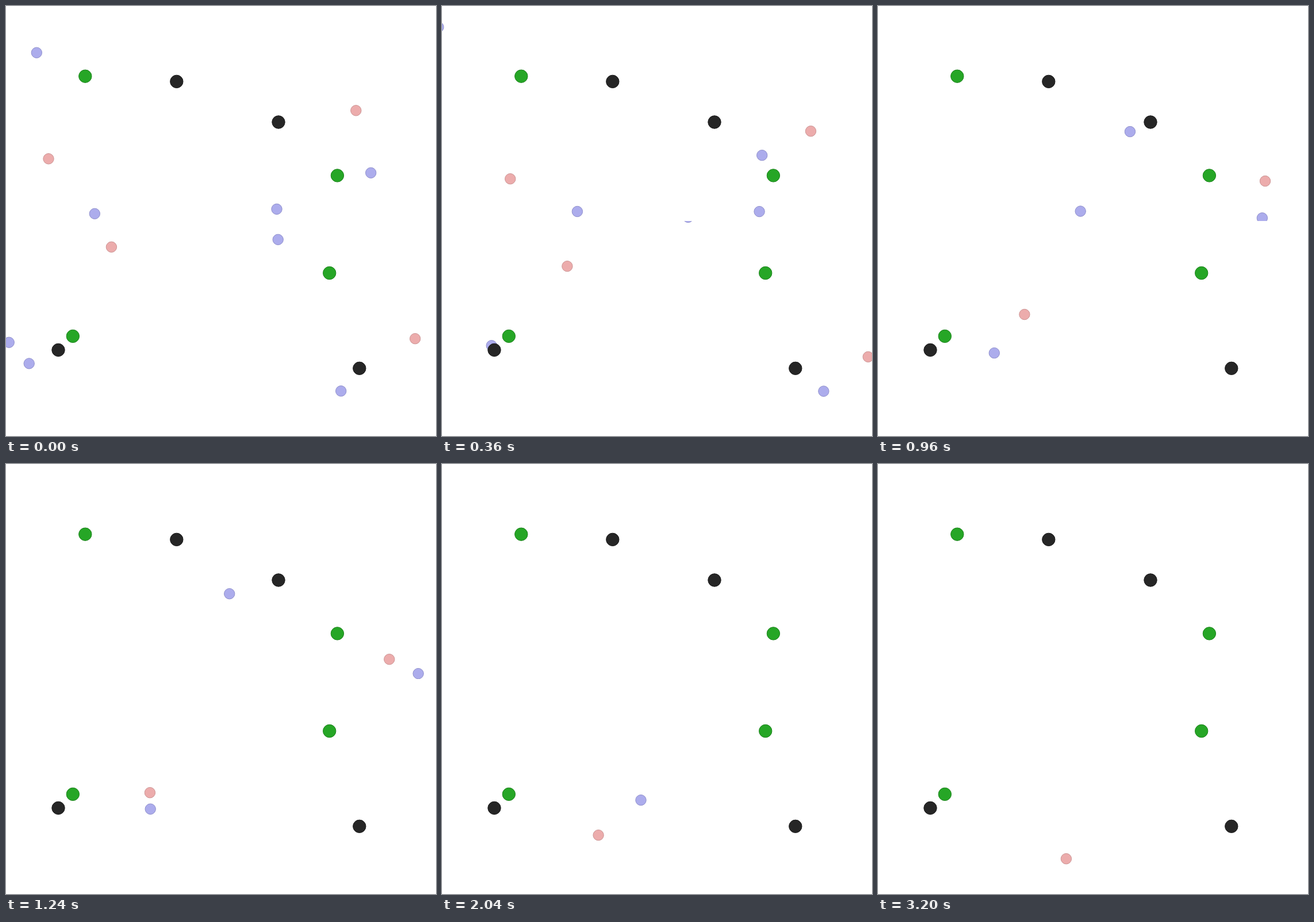
An HTML page with a canvas that plays this animation: 748 by 748 pixels, repeating every 3.24 s.

```html
<!DOCTYPE html>
<html lang="en">
<head>
<meta charset="utf-8">
<title>Drifting particles</title>
<style>
html, body { margin: 0; width: 100%; height: 100%; overflow: hidden; background: #fff; }
canvas { display: block; }
</style>
</head>
<body>
<canvas id="stage" width="748" height="748"></canvas>
<script>
const ctx = document.getElementById('stage').getContext('2d');
const LOOP = 3240, STEP = 40, SIZE = 748, HALF = SIZE / 2;

const BLUE = ['#acacec', '#8f8fcb'], PINK = ['#ecacac', '#cb9393'];
const GREEN = ['#26a626', '#1d821d'], BLACK = ['#262626', '#1c1c1c'];

// Each kind of drift is one shared path of key points: time, then offset from the start.
const path = (...keys) => [[0, 0, 0], ...keys].map(([t, x, y]) => ({ t, x, y }));
const right = path([360, 81, 5.5], [680, 144, 17], [1240, 246, 15], [1600, 299.5, 8],
  [1900, 328, -2.5], [2520, 383, 27]);
const left = path([360, -78, -30.5], [680, -145.5, -62.5], [900, -185.5, -71.5],
  [1240, -246, -64.5], [1600, -310, -68]);
const down = path([360, 34.5, 33.5], [680, 66, 80], [1240, 67, 152.5], [1600, 62, 196],
  [2240, 104.5, 234], [2520, 124.5, 239.5], [3200, 144, 267.5]);

// A mover follows its path from (x, y), turned by some radians and scaled.
const mover = (style, drift, x, y, turn = 0, scale = 1) => ({ style, drift, x, y, turn, scale });

// Four clipped panels, left to right and top to bottom, in stage coordinates.
const panels = [
  { green: [137.8, 122.2], black: [296.8, 131.4], movers: [
    mover(BLUE, left, 53.3, 81.2, 0.269, 0.887),
    mover(PINK, down, 74, 265.8, -0.108, 1.18),
    mover(BLUE, right, 154.3, 361.3, -0.115)
  ] },
  { green: [576.4, 294.9], black: [474, 202], movers: [
    mover(BLUE, right, 471, 353.3, -0.015),
    mover(PINK, down, 608.8, 181.8, 0.062, 1.01),
    mover(BLUE, left, 634.7, 290.2)
  ] },
  { green: [116.3, 574.4], black: [91, 598.4], movers: [
    mover(BLUE, right, 5.2, 585.2),
    mover(BLUE, left, 40.2, 621.9, 0.3, 0.8),
    mover(PINK, down, 183.4, 419.2)
  ] },
  { green: [562.7, 464.5], black: [614.8, 630.3], movers: [
    mover(BLUE, left, 473.2, 406.3, 0.34, 0.711),
    mover(PINK, down, 711.7, 578.7, 0.047, 0.9),
    mover(BLUE, right, 582.7, 669.8, -0.064)
  ] }
];

function slope(keys, i, axis) {
  const rate = k => (keys[k + 1][axis] - keys[k][axis]) / (keys[k + 1].t - keys[k].t);
  if (i === 0) return rate(0);
  if (i === keys.length - 1) return rate(i - 1);
  const before = keys[i].t - keys[i - 1].t, after = keys[i + 1].t - keys[i].t;
  return (rate(i - 1) * after + rate(i) * before) / (before + after);
}

// Cubic Hermite curve through the key points.
function along(keys, t, axis) {
  let i = 0;
  while (i < keys.length - 2 && t > keys[i + 1].t) i++;
  const a = keys[i], b = keys[i + 1], h = b.t - a.t, u = (t - a.t) / h, v = 1 - u;
  return v * v * (1 + 2 * u) * a[axis] + u * u * (1 + 2 * v) * b[axis] +
    h * u * v * (v * slope(keys, i, axis) - u * slope(keys, i + 1, axis));
}

function dot([fill, line], x, y, r) {
  ctx.beginPath();
  ctx.arc(x, y, r, 0, 2 * Math.PI);
  ctx.fillStyle = fill;
  ctx.fill();
  ctx.strokeStyle = line;
  ctx.stroke();
}

function drawMover({ style, drift, x, y, turn, scale }, t) {
  if (t > drift.at(-1).t) return;
  const dx = along(drift, t, 'x') * scale, dy = along(drift, t, 'y') * scale;
  const c = Math.cos(turn), s = Math.sin(turn);
  dot(style, x + dx * c - dy * s, y + dx * s + dy * c, 9.2);
}

function draw(t) {
  ctx.clearRect(0, 0, SIZE, SIZE);
  panels.forEach(({ green, black, movers }, i) => {
    ctx.save();
    ctx.beginPath();
    ctx.rect(i % 2 * HALF, Math.floor(i / 2) * HALF, HALF, HALF);
    ctx.clip();
    movers.forEach(m => drawMover(m, t));
    dot(GREEN, ...green, 11.2);
    dot(BLACK, ...black, 11.2);
    ctx.restore();
  });
}

const start = performance.now();
function tick() {
  const t = (performance.now() - start) % LOOP;
  draw(Math.floor(t / STEP) * STEP);
  requestAnimationFrame(tick);
}
tick();
</script>
</body>
</html>
```
